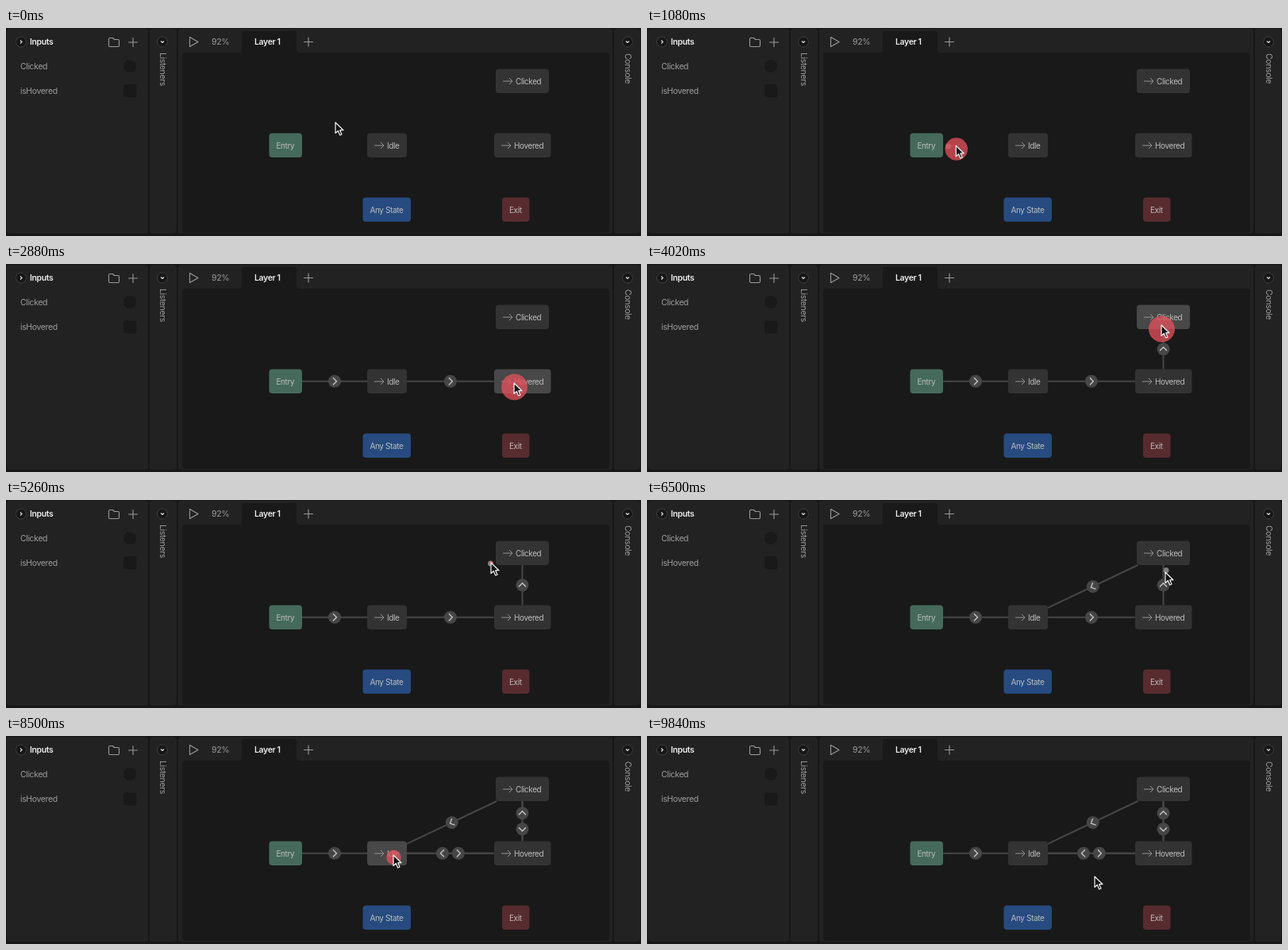
Animation, 800 px wide and 262 px high, one loop 9.9 s. Source, as an HTML page:

```html
<!DOCTYPE html>
<html lang="en">
<head>
<meta charset="utf-8">
<title>State machine editor</title>
<style>
  html, body { margin: 0; width: 100%; height: 100%; overflow: hidden; background: #171717; }
  svg { display: block; width: 800px; height: 262px; }
  text { font: 10.5px Inter, "Open Sans", sans-serif; letter-spacing: -.38px; fill: #9c9c9c; }
  .strong { font-weight: 600; fill: #ececec; }
  .panel { fill: #222; }
  .well { fill: #191919; }
  .icon { fill: none; stroke: #9a9a9a; stroke-width: 1.1; stroke-linecap: round; stroke-linejoin: round; }
  .toggle circle { fill: #171717; stroke: #3d3d3d; }
  .toggle path { fill: none; stroke: #ddd; stroke-width: 1.2; }
  .node text { font-size: 10px; letter-spacing: -.4px; fill: #bcbcbc; }
  .node path { fill: none; stroke: #929292; }
  .link line, #rubber { stroke: #464646; stroke-width: 2; }
  .link circle { fill: #464646; }
  .link path { fill: none; stroke: #c8c8c8; stroke-width: 1.3; }
</style>
</head>
<body>
<svg viewBox="0 0 800 262">
  <rect class="panel" x="1" y="1" width="178" height="258" rx="4"/>
  <rect class="panel" x="181" y="1" width="34" height="258" rx="4"/>
  <rect class="panel" x="217" y="1" width="547" height="258" rx="4"/>
  <rect class="panel" x="766" y="1" width="33" height="258" rx="4"/>
  <path class="well" d="M293 31q4 0 4-4V8q0-4 4-4h61q4 0 4 4v19q0 4 4 4z"/>
  <rect class="well" x="222" y="31" width="538" height="227" rx="4"/>

  <g class="toggle">
    <circle cx="19" cy="17.5" r="6.5"/><path d="M18 15.5l2 2-2 2"/>
    <circle cx="197" cy="17.5" r="6.5"/><path d="M195 16.5l2 2 2-2"/>
    <circle cx="783" cy="17.5" r="6.5"/><path d="M781 16.5l2 2 2-2"/>
  </g>
  <g class="icon">
    <path d="M129.5 14q0-1.500 1.500-1.500h3.500l2 2h4.500q1.500 0 1.500 1.500v6q0 1.500-1.500 1.500h-10q-1.500 0-1.500-1.500z"/>
    <path d="M154.500 18h11M160 12.500v11M375.500 17.500h11M381 12v11"/>
    <path d="M231.500 11.500v12l10.500-6z"/>
  </g>
  <text class="strong" x="30" y="21">Inputs</text>
  <text x="18" y="52">Clicked</text>
  <text x="18" y="83">isHovered</text>
  <circle cx="156" cy="48" r="8" fill="#191919"/>
  <rect x="148" y="71" width="16.500" height="16.500" rx="4" fill="#191919"/>
  <text x="259" y="21">92%</text>
  <text class="strong" x="313" y="21">Layer 1</text>
  <text transform="translate(193.500 31) rotate(90)">Listeners</text>
  <text transform="translate(779.500 32) rotate(90)">Console</text>

  <g id="links"></g>
  <line id="rubber"/>
  <g id="nodes"></g>
  <circle id="handle" r="3.500" fill="#808080"/>
  <circle id="press" fill="#e0505a" fill-opacity=".78"/>
  <path id="cursor" d="M0 0V13.500L3.300 10.500L5.700 16L8 15L5.700 9.700H10Z" fill="#111" stroke="#f2f2f2" stroke-width="1.200" stroke-linejoin="round"/>
</svg>
<script>
const LOOP = 9900;
const $ = id => document.getElementById(id);

function make(parent, tag, attrs = {}) {
  const el = document.createElementNS("http://www.w3.org/2000/svg", tag);
  set(el, attrs);
  return parent.appendChild(el);
}
function set(el, attrs) {
  for (const key in attrs) el.setAttribute(key, attrs[key]);
}
const show = (el, on) => el.style.display = on ? "" : "none";

function node(label, x, y, w, fill, hasArrow) {
  const g = make($("nodes"), "g", { class: "node" });
  const box = make(g, "rect", { x, y, width: w, height: 30.5, rx: 4, fill });
  if (hasArrow) make(g, "path", { d: `M${x + 9} ${y + 15.5}h12m-4-4l4 4l-4 4` });
  make(g, "text", { x: x + (hasArrow ? 25 : 9), y: y + 19 }).textContent = label;
  return { x, y, w, h: 30.5, cx: x + w / 2, cy: y + 15.25, box, fill, hasArrow };
}

const entry = node("Entry", 331.5, 132.5, 41.5, "#456a5b");
const idle = node("Idle", 455, 132.5, 50, "#333", true);
const hovered = node("Hovered", 615, 132.5, 71.5, "#333", true);
const clicked = node("Clicked", 617, 51.5, 67, "#333", true);
const any = node("Any State", 449.5, 213.5, 60.5, "#274b80");
const exit = node("Exit", 625, 213.5, 34.5, "#582c2f");
const nodes = [entry, idle, hovered, clicked, any, exit];

// Pointer path: time, x, y
const path = [
  [0, 415, 119], [720, 380, 148], [980, 380, 148], [1540, 488, 151], [1780, 491, 152],
  [2100, 511, 148], [2220, 511, 148], [2860, 640, 150], [3040, 641, 150],
  [3400, 650, 127], [3480, 650, 127], [3880, 648, 77], [4200, 648, 77],
  [5040, 611, 79], [5260, 611, 79], [5900, 489, 148], [6060, 489, 148],
  [6460, 653, 91], [6580, 653, 91], [6980, 651, 143], [7140, 651, 143],
  [7540, 599, 153], [7600, 599, 153], [7680, 607, 152], [7740, 607, 152],
  [8340, 488, 150], [8500, 488, 150], [9160, 564, 177], [LOOP, 564, 177]
];

const drags = [
  [entry, idle, 960, 1640], [idle, hovered, 2180, 2960], [hovered, clicked, 3440, 4120],
  [clicked, idle, 5240, 6000], [clicked, hovered, 6540, 7080], [hovered, idle, 7700, 8440]
].map(([from, to, down, up]) => ({ from, to, down, up }));

// Where the ray from a node's centre towards another leaves its box
function edge(a, b) {
  const dx = b.cx - a.cx, dy = b.cy - a.cy;
  const k = Math.min(a.w / 2 / Math.abs(dx), a.h / 2 / Math.abs(dy));
  return [a.cx + dx * k, a.cy + dy * k];
}

hovered.cx = clicked.cx;
for (const d of drags) {
  const [x1, y1] = edge(d.from, d.to), [x2, y2] = edge(d.to, d.from);
  const g = d.link = make($("links"), "g", { class: "link" });
  make(g, "line", { x1, y1, x2, y2 });
  d.mid = [(x1 + x2) / 2, (y1 + y2) / 2];
  d.angle = Math.atan2(y2 - y1, x2 - x1);
  d.badge = make(g, "g");
  make(d.badge, "circle", { r: 8 });
  make(d.badge, "path", { d: "M-2 -4.500L2.500 0L-2 4.500" });
  d.twin = drags.find(o => o.from === d.to && o.to === d.from);
}
// Badges stay above every line
for (const d of drags) $("links").append(d.link.cloneNode(false)), $("links").lastChild.append(d.badge), d.badgeBox = $("links").lastChild;

function pointer(t) {
  const i = path.findIndex(p => p[0] > t);
  const [t0, x0, y0] = path[i - 1], [t1, x1, y1] = path[i];
  const u = (t - t0) / (t1 - t0), k = u * u * (3 - 2 * u);
  return [x0 + (x1 - x0) * k, y0 + (y1 - y0) * k];
}

const inside = (n, x, y) => x >= n.x && x <= n.x + n.w && y >= n.y && y <= n.y + n.h;
const clamp = (v, lo, hi) => Math.max(lo, Math.min(hi, v));

// Point on the node's outline, grown by a small margin, nearest to the pointer
function handleAt(n, x, y) {
  const px = clamp(x, n.x, n.x + n.w), py = clamp(y, n.y, n.y + n.h);
  const dx = x - px, dy = y - py;
  if (Math.abs(dx) > Math.abs(dy)) return [px + Math.sign(dx) * 6.5, py + 1];
  return [px + 1, py + Math.sign(dy) * 6.5];
}
function isNear(n, x, y) {
  const dx = x - clamp(x, n.x, n.x + n.w), dy = y - clamp(y, n.y, n.y + n.h);
  const gap = Math.hypot(dx, dy);
  return gap > 0 && gap < 18;
}

function pressRadius(t) {
  const d = drags.find(d => t >= d.down && t < d.up + 140);
  return d ? 16.5 * clamp(Math.min((t - d.down) / 140, (d.up + 140 - t) / 140), 0, 1) : 0;
}

function render(t) {
  const [x, y] = pointer(t);
  const drag = drags.find(d => t >= d.down && t < d.up);
  const snapped = drag && inside(drag.to, x, y);

  for (const d of drags) d.on = t >= d.up || (d === drag && snapped);
  for (const d of drags) {
    const shift = d.twin && d.twin.on ? 10 : 0;
    show(d.link, d.on);
    show(d.badgeBox, d.on);
    const bx = d.mid[0] + Math.cos(d.angle) * shift, by = d.mid[1] + Math.sin(d.angle) * shift;
    set(d.badge, { transform: `translate(${bx} ${by}) rotate(${d.angle * 180 / Math.PI})` });
  }
  for (const n of nodes) {
    set(n.box, { fill: n.hasArrow && inside(n, x, y) ? "#484848" : n.fill });
  }

  let grip = null;
  if (drag) {
    if (!snapped) grip = handleAt(drag.from, ...pointer(drag.down));
  } else if (!nodes.some(n => inside(n, x, y))) {
    const n = nodes.find(n => isNear(n, x, y));
    if (n) grip = handleAt(n, x, y);
  }
  show($("handle"), grip);
  show($("rubber"), drag && grip);
  if (grip) {
    set($("handle"), { cx: grip[0], cy: grip[1] });
    set($("rubber"), { x1: grip[0], y1: grip[1], x2: x, y2: y });
  }

  const r = pressRadius(t);
  set($("press"), { cx: x + .5, cy: y + r * .3, r });
  set($("cursor"), { transform: `translate(${x} ${y})` });
}

function tick() {
  render(performance.now() % LOOP);
  requestAnimationFrame(tick);
}
tick();
</script>
</body>
</html>
```
